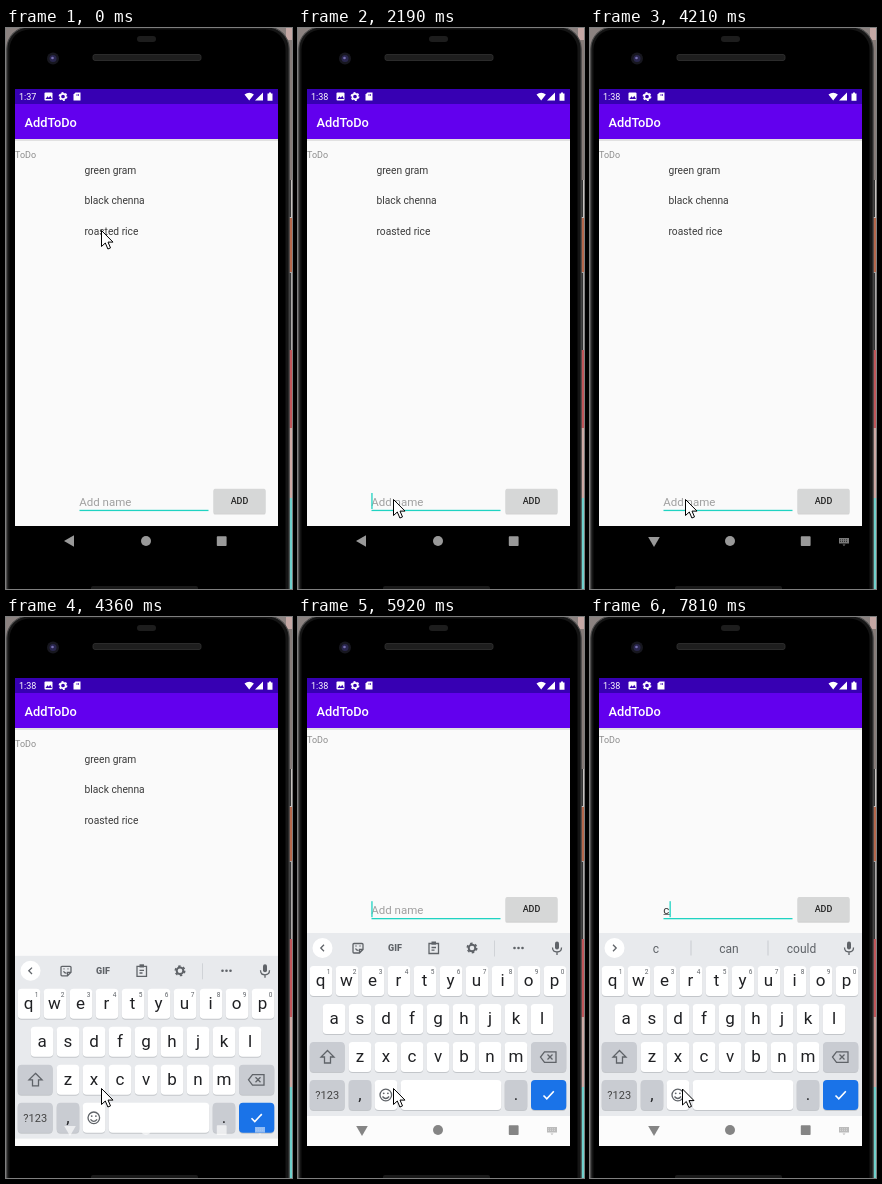
An HTML page that plays this animation: 286x561 px, repeating every 8 s.

```html
<!DOCTYPE html>
<html lang="en">
<head>
<meta charset="utf-8">
<title>To-do app</title>
<style>
html, body { margin: 0; width: 100%; height: 100%; overflow: hidden; background: #000; }
svg { display: block; width: 100%; height: 100%; font-family: Roboto, sans-serif; }
.mid { text-anchor: middle; }
.line { fill: none; stroke: #5f6368; stroke-width: 1.3; }
.key { font-size: 17px; fill: #202124; text-anchor: middle; }
.hint { font-size: 6.5px; fill: #5f6368; text-anchor: middle; }
.word { font-size: 12px; fill: #5f6368; text-anchor: middle; }
.item { font-size: 10.24px; fill: #3b3b3b; }
</style>
</head>
<body>
<svg viewBox="0 0 286 561">
  <defs>
    <clipPath id="screen"><rect x="9" y="61" width="263" height="468"/></clipPath>
    <g id="gear">
      <circle r="3.3" fill="none" stroke="currentColor" stroke-width="2"/>
      <circle r="4.7" fill="none" stroke="currentColor" stroke-width="1.6" stroke-dasharray="2.46"/>
    </g>
  </defs>

  <!-- backdrop and phone body -->
  <rect width="286" height="561" fill="#8b8280"/>
  <g id="backdrop"></g>
  <rect x="282" y="152" width="3" height="37" fill="#333"/>
  <rect x="282" y="245" width="3" height="77" fill="#333"/>
  <rect x=".8" y="-1" width="282.4" height="600" rx="22" fill="#151515" stroke="#4a4a4a" stroke-width="1.2"/>
  <rect x="3.5" y="1.5" width="276" height="600" rx="20"/>
  <rect x="131" y="8" width="19" height="6" rx="3" fill="#1d1d1d"/>
  <rect x="87" y="26.500" width="108" height="6" rx="2" fill="#1e1e1e" stroke="#333" stroke-width=".8"/>
  <circle cx="47" cy="30.500" r="6" fill="#17171f"/>
  <circle cx="47" cy="30.500" r="3.500" fill="#29264d"/>
  <circle cx="46.500" cy="30" r="1.300" fill="#7770b0"/>
  <rect x="85" y="558" width="107" height="5" rx="2" fill="#1a1a1a"/>

  <g clip-path="url(#screen)">
    <rect x="9" y="61" width="263" height="468" fill="#fafafa"/>
    <rect x="9" y="111" width="263" height="2" fill="#000" opacity=".1"/>
    <rect x="9" y="61" width="263" height="15" fill="#3700b3"/>
    <rect x="9" y="76" width="263" height="35" fill="#6200ee"/>

    <g fill="#fff" color="#fff">
      <text id="clock" x="13" y="72" font-size="9"></text>
      <rect x="38.500" y="64.500" width="8" height="8" rx="1"/>
      <path d="M39.500 71l2-2.700 1.300 1.500 1.500-2 1.700 3.200z" fill="#3700b3"/>
      <use href="#gear" transform="translate(57 68.500) scale(.8)"/>
      <path d="M69.500 64.500h5v8h-7v-6z"/>
      <path d="M71 66v2m1.500-2v2" stroke="#3700b3" stroke-width=".7"/>
      <path d="M238.500 66.500q4.700-3.500 9.400 0l-4.700 6z M257 64.500v8h-8z"/>
      <path d="M261.500 65.500h1.500v-1h2v1h1.500v7.200h-5z"/>
      <text x="18.500" y="98.700" font-size="12.800" font-weight="500">AddToDo</text>
    </g>

    <text id="heading" x="9" font-size="8.960" fill="#8b8b8b">ToDo</text>
    <g id="list">
      <text class="item" x="78.500" y="145.500">green gram</text>
      <text class="item" x="78.500" y="176">black chenna</text>
      <text class="item" x="78.500" y="206.700">roasted rice</text>
    </g>

    <g id="form">
      <text id="empty" x="73.300" y="477.500" font-size="11.500" fill="#a0a0a0">Add name</text>
      <text id="typed" x="73.300" y="477.500" font-size="11.500" fill="#333">c</text>
      <rect id="compose" x="73.500" y="478" width="6.500" height=".8" fill="#555"/>
      <rect id="caret" y="465" width="1.300" height="16" fill="#20d3c2"/>
      <rect x="73.500" y="481.800" width="129" height="1.300" fill="#20d3c2"/>
      <rect x="207.500" y="462" width="52" height="24.500" rx="1.500" fill="#000" opacity=".16"/>
      <rect x="207.500" y="460.800" width="52" height="24.500" rx="1.500" fill="#d6d7d7"/>
      <text class="mid" x="233.500" y="476" font-size="8.960" font-weight="500" fill="#222">ADD</text>
    </g>

    <rect id="navBar" x="9" y="498" width="263" height="31"/>

    <g id="keyboard">
      <rect x="9" y="316" width="263" height="183" fill="#e8eaed"/>
      <rect x="9" y="499" width="263" height="32" fill="#fcfcfc"/>
      <circle cx="24.500" cy="331" r="10" fill="#fff"/>
      <path id="chevron" class="line" d="M1.500-3.200l-3.200 3.200 3.200 3.200"/>
      <g id="tools" color="#5f6368">
        <path class="line" d="M56 326.500h8q1 0 1 1v5l-3.500 3.500h-5.500q-1 0-1-1v-7.500q0-1 1-1z M65 332.500h-3.500v3.500 M57.500 331.500q1 2 3 1.800 M57.500 329h1 M61.500 329h1"/>
        <text class="mid" x="97" y="334.300" font-size="9" font-weight="900" fill="#5f6368">GIF</text>
        <path class="line" d="M131 326.500h9.500v10h-9.500z M133.500 326.800h4.500 M133.500 330.500h4.500 M133.500 333.200h3"/>
        <path d="M133.500 324.500h4.500v3h-4.500z" fill="#5f6368"/>
        <use href="#gear" x="174" y="331"/>
        <path d="M196.500 323.500v16" stroke="#d0d3d7"/>
        <g fill="#5f6368"><circle cx="216.500" cy="331" r="1.300"/><circle cx="220.500" cy="331" r="1.300"/><circle cx="224.500" cy="331" r="1.300"/></g>
      </g>
      <g id="suggestions">
        <text class="word" x="66" y="335.500">c</text>
        <text class="word" x="139" y="335.500">can</text>
        <text class="word" x="211.500" y="335.500">could</text>
        <path d="M101 323.500v15M178 323.500v15" stroke="#c8cbd0"/>
      </g>
      <rect x="257" y="324.500" width="4" height="8" rx="2" fill="#5f6368"/>
      <path class="line" d="M254.500 330.500q0 4.500 4.500 4.500t4.500-4.500M259 335v3"/>
      <g id="keys"></g>
      <path class="line" d="M29.500 433.500l6.500 6.500h-3.500v6h-6v-6h-3.500z M246.500 434.800h11.500v10.500h-11.500l-4-5.250z M249.500 437.500l5 5m0-5l-5 5"/>
      <circle class="line" cx="87.800" cy="478" r="5.800"/>
      <path class="line" d="M84.500 479.500q3.300 4 6.600 0"/>
      <circle cx="85.700" cy="476.300" r=".9" fill="#5f6368"/>
      <circle cx="89.900" cy="476.300" r=".9" fill="#5f6368"/>
      <path d="M245.500 478.500l3.300 3.300 7-7.500" fill="none" stroke="#fff" stroke-width="1.600"/>
    </g>

    <g id="nav">
      <path id="back" d="M-6 0L4-5.800V5.800z"/>
      <circle cx="140" cy="513" r="5"/>
      <rect x="210.800" y="508.300" width="9.800" height="9.800" rx=".8"/>
      <path id="imeIcon" d="M249 510h10v5.500h-10z M252.500 516.500h3l-1.500 1.500z"/>
      <path id="imeDots" d="M250 511.800h8M250 513.500h8" stroke-width=".7" stroke-dasharray="1"/>
    </g>
  </g>

  <path id="pointer" d="M0 0V16L3.800 12.500 6.400 18.500 9 17.400 6.500 11.600H11.500Z" fill="#fff" stroke="#000" stroke-width="1"/>
</svg>
<script>
const LOOP = 8000;
const el = Object.fromEntries([...document.querySelectorAll('[id]')].map(n => [n.id, n]));
const set = (id, attrs) => { for (const k in attrs) el[id].setAttribute(k, attrs[k]); };
const show = (id, on) => set(id, { opacity: +on });

// Value of the last step that has begun; steps are [time, value].
const at = (t, steps) => steps.reduce((v, [start, next]) => t >= start ? next : v, steps[0][1]);
const within = (t, spans) => spans.some(([a, b]) => t >= a && t < b);

const keyBox = (x, y, w, fill = '#fff') =>
  `<rect x="${x}" y="${y + 1}" width="${w}" height="30" rx="4" fill="#c3c6ca"/>` +
  `<rect x="${x}" y="${y}" width="${w}" height="30" rx="4" fill="${fill}"/>`;
const label = (x, y, text, cls = 'key', extra = '') => `<text class="${cls}" x="${x}" y="${y}" ${extra}>${text}</text>`;

function buildKeys() {
  const rows = [['qwertyuiop', 23, 349], ['asdfghjkl', 36, 387], ['zxcvbnm', 62, 425]];
  let out = '';
  rows.forEach(([letters, x0, y], row) => [...letters].forEach((c, i) => {
    const x = x0 + i * 26;
    out += keyBox(x - 11.3, y, 22.6) + label(row ? x : x - .5, y + 20, c);
    if (!row) out += label(x + 7.5, y + 8.3, (i + 1) % 10, 'hint');
  }));
  const grey = '#c9ccd2';
  out += keyBox(11.7, 425, 35, grey) + keyBox(233, 425, 35.3, grey);
  out += keyBox(11.7, 463, 35, grey) + keyBox(50.7, 463, 22.6, grey) + keyBox(76.7, 463, 22.6);
  out += keyBox(102.7, 463, 100.6) + keyBox(206.7, 463, 22.6, grey) + keyBox(233, 463, 35.3, '#1a73e8');
  out += label(29.2, 482, '?123', 'key', 'style="font-size:11px;fill:#444"');
  return out + label(62, 483, ',') + label(218, 483, '.');
}

el.keys.innerHTML = buildKeys();
el.backdrop.innerHTML = [
  [0, 12, '#c5a8a5'], [12, 140, '#857b78'], [152, 38, '#c4c0bd'], [190, 54, '#b5684c'],
  [244, 78, '#a9a6a5'], [322, 78, '#c0565a'], [400, 70, '#cda9a4'], [470, 91, '#6fd0cc']
].map(([y, h, fill]) => `<rect x="280" y="${y}" width="6" height="${h}" fill="${fill}"/>`).join('');

const pointerPath = [
  [0, [95.5, 202.5]], [310, [97, 215]], [460, [104, 262]], [600, [112, 330]], [750, [117, 400]],
  [900, [119, 455]], [1040, [117, 490]], [1190, [112, 497]], [1340, [103, 482]],
  [1490, [98, 464]], [1620, [96, 468]], [1760, [95.5, 471.5]], [7670, [94, 471.5]], [7810, [92.5, 472]]
];
const caretOn = [[1190, 1760], [2190, 2740], [3770, 4210], [5060, 5360], [5920, 6320], [6570, 7130], [7540, LOOP]];

function draw(t) {
  const open = t >= 4360, resized = t >= 4530, typing = t >= 6570, suggesting = t >= 7270;
  el.clock.textContent = t < 750 ? '1:37' : '1:38';
  set('pointer', { transform: `translate(${at(t, pointerPath)})` });

  set('heading', { y: resized ? 125.5 : 130 });
  show('list', !resized);
  set('form', { transform: `translate(0 ${resized ? -180.8 : 0})` });
  show('empty', !typing);
  show('typed', typing);
  show('compose', t >= 6840);
  show('caret', within(t, caretOn));
  set('caret', { x: typing ? 79.5 : 73.3 });

  show('keyboard', open);
  set('keyboard', { transform: `translate(0 ${resized ? 0 : 22.8})` });
  show('tools', !suggesting);
  show('suggestions', suggesting);
  set('chevron', { transform: `translate(24.5 331) scale(${suggesting ? -1 : 1} 1)` });

  const ink = at(t, [[0, '#999'], [4360, '#fff'], [4530, '#858585']]);
  set('navBar', { fill: open ? '#fcfcfc' : '#000' });
  set('nav', { fill: ink, opacity: at(t, [[0, 1], [4360, .65], [4530, .08], [4660, .6], [5060, .85], [5200, 1]]) });
  set('back', { transform: `translate(64 513) rotate(${at(t, [[0, 0], [3320, -30], [3470, -75], [3770, -90]])})` });
  const ime = at(t, [[0, 0], [3320, .4], [3470, .8], [4530, .55]]);
  set('imeIcon', { opacity: ime });
  set('imeDots', { opacity: ime, stroke: open ? '#fcfcfc' : '#000' });
}

const begin = performance.now();
(function tick() {
  draw((performance.now() - begin) % LOOP);
  requestAnimationFrame(tick);
})();
</script>
</body>
</html>
```
